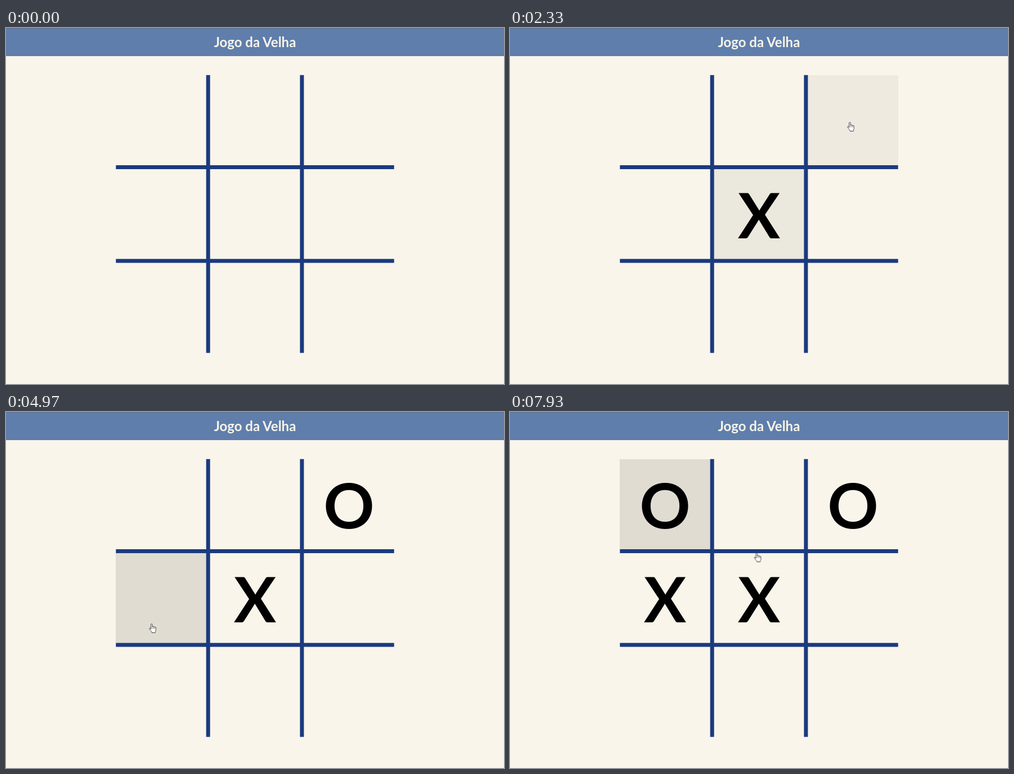
These frames come from a looping animation (885 by 633 pixels, 8 s). An HTML page:

```html
<!DOCTYPE html>
<html lang="pt">
<head>
<meta charset="utf-8">
<title>Jogo da Velha</title>
<style>
  html, body { margin: 0; width: 100%; height: 100%; overflow: hidden; background: #f9f5ea; }
  svg { display: block; width: 100%; height: 100%; }
  text { font-family: Lato, sans-serif; font-weight: 700; text-anchor: middle; }
  .title { font-size: 24px; fill: #f9f5ea; }
  .mark { font-size: 112px; opacity: 0; animation: 8s step-end infinite; }
  .cell { opacity: 0; animation: 8s ease infinite; }
  .grid { fill: #1b3a7f; }

  /* Percentages are milliseconds / 80 */
  #hand { animation: move 8s linear infinite; }
  @keyframes move {
    0%, 2.875% { transform: translate(888px, 578px); animation-timing-function: ease-in-out; }
    9.5%, 11.25% { transform: translate(342px, 187px); animation-timing-function: ease-in-out; }
    13.625%, 17.125% { transform: translate(328px, 187px); animation-timing-function: ease-in-out; }
    19.75%, 26% { transform: translate(450.5px, 286px); animation-timing-function: ease-in-out; }
    29.125% { transform: translate(599px, 167px); }
    31.75%, 33% { transform: translate(600px, 165px); }
    37.75%, 47.4% { transform: translate(588px, 180px); }
    48.125% { transform: translate(557px, 213px); }
    48.75% { transform: translate(520px, 250px); }
    49.75% { transform: translate(443px, 333px); }
    50.75% { transform: translate(353px, 371px); animation-timing-function: ease-out; }
    56%, 58.875% { transform: translate(222px, 401px); animation-timing-function: ease-in-out; }
    62.125%, 63.375% { transform: translate(254px, 376px); }
    65.25%, 70.625% { transform: translate(260px, 362px); }
    74.375% { transform: translate(284px, 364px); }
    77.5% { transform: translate(330px, 321px); }
    79.4% { transform: translate(335px, 246px); }
    80.5%, 95.375% { transform: translate(323.5px, 203px); }
    97.75% { transform: translate(329px, 206px); }
    98.625% { transform: translate(351px, 214px); }
    99.125%, 100% { transform: translate(433.5px, 250px); }
  }

  #tl { animation-name: tl; }
  #tm { animation-name: tm; }
  #tr { animation-name: tr; }
  #ml { animation-name: ml; }
  #mm { animation-name: mm; }
  #mr { animation-name: mr; }
  @keyframes tl {
    0%, 8.75% { opacity: 0; }
    15%, 17.875% { opacity: .1; }
    24.125%, 79.4% { opacity: 0; }
    85.65%, 100% { opacity: .1; }
  }
  @keyframes tm {
    0%, 7.85% { opacity: 0; }
    8.75% { opacity: .01; }
    10%, 17.95% { opacity: 0; }
    18.5% { opacity: .004; }
    19.5%, 100% { opacity: 0; }
  }
  @keyframes tr {
    0%, 27.5% { opacity: 0; }
    33.75%, 48.5% { opacity: .1; }
    54.75%, 100% { opacity: 0; }
  }
  @keyframes ml {
    0%, 50.75% { opacity: 0; }
    57%, 79.4% { opacity: .1; }
    85.65%, 100% { opacity: 0; }
  }
  @keyframes mm {
    0%, 7% { opacity: 0; }
    7.85% { opacity: .01; }
    9%, 18.5% { opacity: 0; }
    24.75%, 27.5% { opacity: .1; }
    33.75%, 48.7% { opacity: 0; animation-timing-function: ease-in; }
    50.75% { opacity: .045; }
    53.7%, 100% { opacity: 0; }
  }
  @keyframes mr {
    0%, 6.1% { opacity: 0; }
    7% { opacity: .01; }
    8%, 100% { opacity: 0; }
  }

  #x1 { animation-name: x1; }
  #o1 { animation-name: o1; }
  #x2 { animation-name: x2; }
  #o2 { animation-name: o2; }
  @keyframes x1 { 0% { opacity: 0; } 22.75%, 100% { opacity: 1; } }
  @keyframes o1 { 0% { opacity: 0; } 43.75%, 100% { opacity: 1; } }
  @keyframes x2 { 0% { opacity: 0; } 68.25%, 100% { opacity: 1; } }
  @keyframes o2 { 0% { opacity: 0; } 91.25%, 100% { opacity: 1; } }
</style>
</head>
<body>
<svg viewBox="0 0 885 633">
  <rect width="885" height="633" fill="#f9f5ea"/>
  <rect width="885" height="50" fill="#5f7eab"/>
  <rect width="885" height="1" fill="#5f6f88"/>
  <text class="title" x="442.5" y="34">Jogo da Velha</text>

  <rect class="cell" id="tl" x="195" y="84" width="161" height="160"/>
  <rect class="cell" id="tm" x="363" y="84" width="159" height="160"/>
  <rect class="cell" id="tr" x="529" y="84" width="161" height="160"/>
  <rect class="cell" id="ml" x="195" y="251" width="161" height="160"/>
  <rect class="cell" id="mm" x="363" y="251" width="159" height="160"/>
  <rect class="cell" id="mr" x="529" y="251" width="161" height="160"/>

  <g class="grid">
    <rect x="355.7" y="83.7" width="7" height="494"/>
    <rect x="522.4" y="83.7" width="7" height="494"/>
    <rect x="195.3" y="244" width="494.4" height="7"/>
    <rect x="195.3" y="410.6" width="494.4" height="7"/>
  </g>

  <text class="mark" id="x1" x="442.5" y="374">X</text>
  <text class="mark" id="o1" x="609.5" y="207">O</text>
  <text class="mark" id="x2" x="275.5" y="374">X</text>
  <text class="mark" id="o2" x="275.5" y="207">O</text>

  <g id="hand">
    <path d="M3.6 10.2V1.9Q3.6 .6 4.8 .6T6 1.9V6Q6.3 5.2 7.2 5.2T8.3 6.2Q8.6 5.7 9.4 5.7T10.5 6.8Q10.8 6.4 11.4 6.4Q12.4 6.4 12.4 7.7V11.5Q12.4 13.4 11.2 14.5V16.5H5.2V15Q3.6 13.6 2.4 11.6L.9 9.6Q.3 8.6 1.1 8.1T2.6 8.6Z" fill="#fff" stroke="#333" stroke-width=".9" stroke-linejoin="round"/>
    <path d="M6 6V9.5M8.3 6.2V9.5M10.5 6.8V9.5" fill="none" stroke="#444" stroke-width=".7"/>
  </g>
</svg>
</body>
</html>
```
